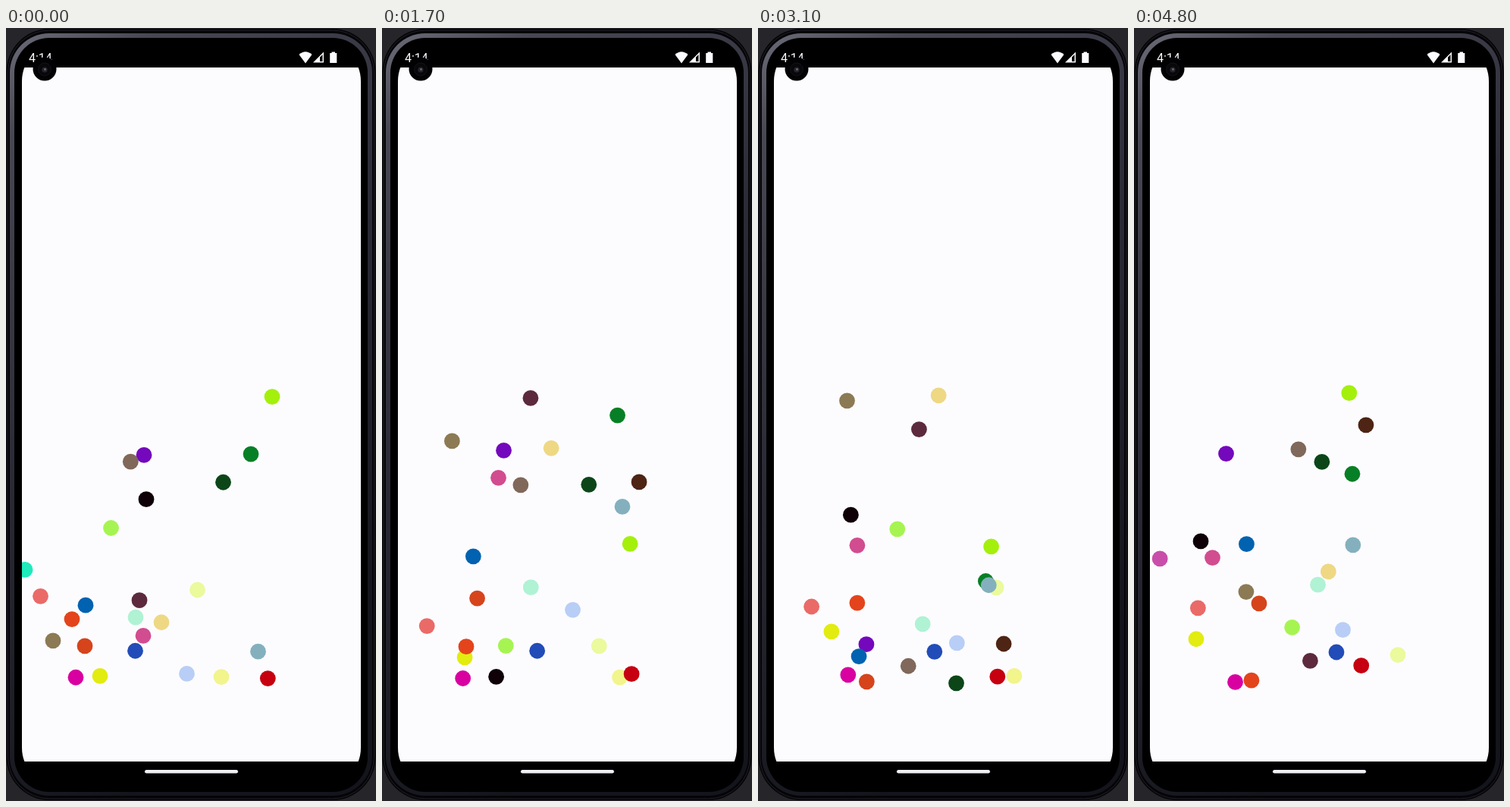
Write an HTML page that moves like this. It is 488 px wide and 1018 px high and loops after 4.9 s.

```html
<!DOCTYPE html>
<html lang="en">
<head>
<meta charset="utf-8">
<title>Bouncing balls</title>
<style>
  html, body { margin: 0; width: 100%; height: 100%; overflow: hidden; background: #25252a; }
  svg { display: block; width: 100vw; height: 100vh; }
  text { font: 16px Roboto, sans-serif; fill: #fcfcff; }
</style>
</head>
<body>
<svg viewBox="0 0 488 1018">
  <defs>
    <linearGradient id="metal" x1="0" y1="0" x2="0.35" y2="1">
      <stop offset="0" stop-color="#6c6c78"/>
      <stop offset="0.12" stop-color="#484854"/>
      <stop offset="0.5" stop-color="#2c2c38"/>
      <stop offset="1" stop-color="#14141c"/>
    </linearGradient>
    <clipPath id="display"><rect x="21" y="20" width="447" height="978" rx="50"/></clipPath>
    <clipPath id="app"><rect x="21" y="52" width="447" height="914"/></clipPath>
  </defs>

  <!-- phone body -->
  <rect x="0.5" y="1" width="487" height="1016" rx="57" fill="#050508"/>
  <rect x="2.5" y="3" width="483" height="1012" rx="55" fill="none" stroke="#202026"/>
  <rect x="5" y="7" width="478" height="1004" rx="52" fill="url(#metal)"/>
  <rect x="11" y="13" width="466" height="993" rx="46" fill="#000"/>

  <g clip-path="url(#display)">
    <g clip-path="url(#app)">
      <rect x="21" y="52" width="447" height="914" fill="#fcfcff"/>
      <g id="balls"></g>
    </g>
  </g>

  <!-- status bar -->
  <text x="30" y="45">4:14</text>
  <g fill="#fcfcff">
    <path d="M395 46.5 386.5 35Q395 27.5 403.5 35Z"/>
    <path fill-rule="evenodd" d="M405 45.5 419 31.5V45.5ZM414 38.5V44H417.5V35Z"/>
    <path d="M429.5 33V31.5H434V33H436.3V46H427.2V33Z"/>
  </g>
  <circle cx="51" cy="54" r="15.5" fill="#020204"/>
  <circle cx="51" cy="54.5" r="8.5" fill="#08080b" stroke="#131318"/>
  <circle cx="51" cy="55" r="3.6" fill="#25252c"/>
  <circle cx="51.5" cy="54.5" r="1.4" fill="#66666e"/>
  <rect x="183" y="977" width="123" height="4.6" rx="2.3" fill="#f0f0f4"/>
</svg>
<script>
const LOOP = 4900, STEP = 100;
const FLOOR = 863.5, HALF_G = 60; // px and px/s²

// colour, x at 0 s, x speed, apex y, apex time, speed gained per bounce, birth, death
const balls = [
  ['#e2ec10', 124, -8.75, 797, 0.97, 2],
  ['#7408bc', 182, -12.6, 516, 0.88, 2.2],
  ['#f2f48c', 284, 17.4, 853, -0.16, 0, 0, 3.88],
  ['#077f26', 323, -7.3, 488.5, 1.1, 2.2],
  ['#d24c90', 181, -16.15, 590.6, 1.87],
  ['#5c2a3c', 176, 11.75, 475, 2.155],
  ['#0062b0', 105, 9.05, 678.7, 1.165],
  ['#e4441c', 87, 14.15, 751.4, 0.673],
  ['#d6441c', 104, 12.7, 751.5, -1.02, 0.3],
  ['#ea6a68', 45.5, 8.1, 744, -0.27],
  ['#d800a0', 92, 8.65, 848.5, 0.335],
  ['#80685a', 164.3, 10.95, 541.8, 0.7, 2.2],
  ['#0e0006', 185, -20.2, 615.5, -0.295, 1],
  ['#c60010', 345.3, -9.5, 832, -0.64],
  ['#a4f00c', 351, -14, 485, -0.1, 2.2],
  ['#0c4618', 286.5, -8.05, 556.4, 0.835, 2.2],
  ['#a6f452', 138.5, 14.6, 646.9, -0.44, -5.4],
  ['#1eeabc', 25, -8, 711, 0.2, 0, 0, 0.5],
  ['#8c7a54', 62, 17.9, 482, -2.327],
  ['#b0f2d4', 171, 14.9, 726.4, -0.91],
  ['#eed884', 205, 10.7, 479, -2.25],
  ['#224cb8', 170.5, 20.1, 818.5, -0.17, -0.6],
  ['#b8cef6', 238.5, 7.7, 764, -1.2, 2.5],
  ['#eafa9c', 252.5, 19.9, 725.7, 0.488, -0.5],
  ['#84b0be', 332.5, -9.1, 630, 1.785, 1],
  ['#4e2414', 357.3, -10.7, 509.4, 0.485, 2.3, 0.5],
  ['#c84eaa', -35.9, 14.6, 648.1, 3.88, 0, 3.88]
];

const layer = document.getElementById('balls');
const dots = balls.map(([color]) => {
  const dot = document.createElementNS('http://www.w3.org/2000/svg', 'circle');
  dot.setAttribute('r', 10.4);
  dot.setAttribute('fill', color);
  return layer.appendChild(dot);
});

// Height on the arc that holds time t, going from one bounce to the next.
function height(t, apex, peak, gain) {
  let fall = Math.sqrt((FLOOR - apex) / HALF_G);
  // A ball on its way up from the floor may still belong to the arc before.
  if (t < peak - fall) peak -= 2 * fall;
  while (t > peak + fall) {
    const next = fall + gain / (2 * HALF_G);
    peak += fall + next;
    fall = next;
  }
  return FLOOR - HALF_G * (fall ** 2 - (t - peak) ** 2);
}

function draw() {
  const t = Math.floor(performance.now() % LOOP / STEP) * STEP / 1000;
  balls.forEach(([, x, speed, apex, peak, gain = 0, birth = 0, death = Infinity], i) => {
    const dot = dots[i];
    dot.setAttribute('visibility', t >= birth && t < death ? 'visible' : 'hidden');
    dot.setAttribute('cx', x + speed * t);
    dot.setAttribute('cy', height(t, apex, peak, gain));
  });
  requestAnimationFrame(draw);
}
draw();
</script>
</body>
</html>
```
